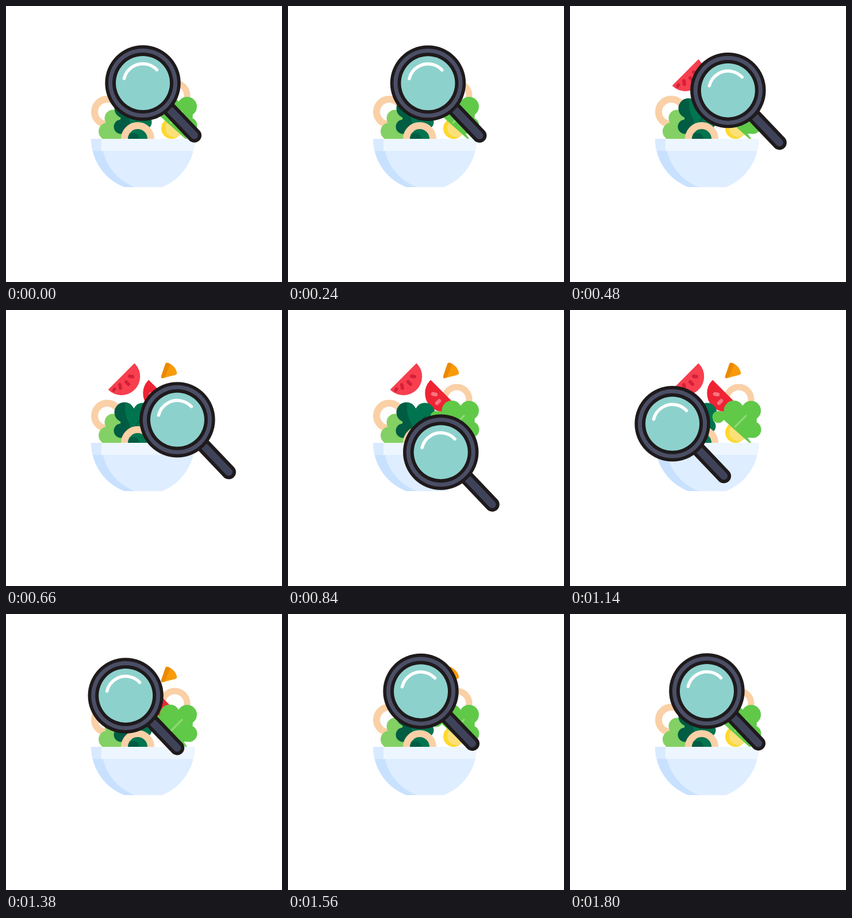
These frames come from a looping animation (480x480 px, 1860 ms). An HTML page with a canvas:

```html
<!DOCTYPE html>
<html lang="en">
<head>
<meta charset="utf-8">
<title>Salad search</title>
<style>
html, body { margin: 0; width: 100%; height: 100%; overflow: hidden; background: #fff; }
canvas { display: block; width: 480px; height: 480px; }
</style>
</head>
<body>
<canvas id="stage" width="480" height="480"></canvas>
<script>
const ctx = document.getElementById('stage').getContext('2d');
const TAU = Math.PI * 2;
const LOOP = 1860, STEP = 60, TURN = 1820;
const PEACH = '#fad0a6', DEEP = '#005c42', FOREST = '#00744f';
const LIME = '#83d064', LEAF = '#60c948', INK = '#1f1a1c';

function disk(x, y, r, color) {
  ctx.fillStyle = color;
  ctx.beginPath();
  ctx.arc(x, y, r, 0, TAU);
  ctx.fill();
}

function ring(x, y, r, width, color) {
  ctx.strokeStyle = color;
  ctx.lineWidth = width;
  ctx.beginPath();
  ctx.arc(x, y, r, 0, TAU);
  ctx.stroke();
}

function line(x1, y1, x2, y2, width, color) {
  ctx.strokeStyle = color;
  ctx.lineWidth = width;
  ctx.lineCap = 'round';
  ctx.beginPath();
  ctx.moveTo(x1, y1);
  ctx.lineTo(x2, y2);
  ctx.stroke();
}

function shape(d, color) {
  ctx.fillStyle = color;
  ctx.fill(new Path2D(d));
}

// Half disc with softened corners; the round side faces angle a.
function slice(x, y, a, color) {
  ctx.save();
  ctx.translate(x, y);
  ctx.rotate(a);
  ctx.fillStyle = ctx.strokeStyle = color;
  ctx.lineWidth = 3;
  ctx.lineJoin = 'round';
  ctx.beginPath();
  ctx.arc(1, 0, 31, -Math.PI / 2 + 0.04, Math.PI / 2 - 0.04);
  ctx.closePath();
  ctx.fill();
  ctx.stroke();
  ctx.restore();
}

function tomatoes() {
  slice(200, 115, Math.PI / 4, '#f73f4f');
  const dark = '#d42038';
  line(215, 115, 220, 116, 6, dark);
  line(209, 125, 213, 129, 6, dark);
  line(198, 130, 199, 136, 6, dark);
  line(189, 137, 187, 140, 5, dark);
  slice(271.5, 144, Math.PI * 0.75, '#ee2435');
  const pink = '#fa7580';
  line(252, 146, 257, 147, 6.5, pink);
  line(259, 162, 263, 158, 6.5, pink);
}

function carrot() {
  shape('M277.5 93Q279 91 282 92Q295 97 297.5 110Q297 112 294 113L273 118.5Q269 119 270 115Z', '#f99b0a');
  shape('M277.5 93Q279 91 282 92L286 94L276 117.5L273 118.5Q269 119 270 115Z', '#ea8a04');
}

function leftLeaves() {
  disk(186, 195, 14.5, LIME);
  disk(176, 218, 15, LIME);
  shape('M184 184L212 190L212 232L166 232L176 206Z', LIME);

  disk(206, 178, 17.5, DEEP);
  disk(200, 210, 12.5, DEEP);
  shape('M206 172L224 196L212 231L204 222L198 204L200 190Z', DEEP);
  disk(238, 179, 17.5, FOREST);
  disk(241, 202, 12.5, FOREST);
  shape('M207 160.5Q218 163 222 174L240 172L252 200L246 231L222 231L214 196Q207 184 207 174Z', FOREST);
  line(226, 200, 239, 185, 2.5, DEEP);
}

function egg() {
  shape('M262 188Q252 202 253 231L314 231Z', '#fff');
  ctx.save();
  ctx.clip(new Path2D('M264 186L253 232H314Z'));
  disk(288, 213, 18, '#fed82e');
  disk(293, 212, 16, '#fbe07a');
  ctx.restore();
}

function rightLeaf() {
  disk(258, 186, 10.5, LEAF);
  disk(285, 175, 17.5, LEAF);
  disk(315, 175, 17, LEAF);
  disk(318, 208, 14.5, LEAF);
  shape('M256 176L270 177L301 167L325 190L321 222L309 222L315 231L312 231L265 189Z', LEAF);
  line(287, 203, 306, 184, 3.5, '#8bdb70');
}

function bowl() {
  ctx.save();
  ctx.clip(new Path2D('M150 231H326Q328 231 328 233A90 90 0 0 1 148 233Q148 231 150 231Z'));
  ctx.clip(new Path2D('M328 231A90 90 0 0 1 148 231Z'));
  ctx.fillStyle = '#c8e1ff';
  ctx.fillRect(148, 231, 180, 90);
  ctx.fillStyle = '#d8eaff';
  ctx.fillRect(148, 231, 20, 21);
  disk(256, 231, 90, '#deedff');
  ctx.fillStyle = '#edf6ff';
  ctx.fillRect(166, 231, 162, 21);
  ctx.restore();
}

function salad() {
  ctx.save();
  ctx.beginPath();
  ctx.rect(0, 0, 480, 315);
  ctx.clip();
  ring(293.5, 155.5, 21.5, 11, PEACH);
  tomatoes();
  carrot();
  ring(176, 184, 22, 12, PEACH);
  leftLeaves();
  egg();
  rightLeaf();
  disk(229, 231, 17, FOREST);
  disk(222, 231, 10, DEEP);
  ring(229, 231, 23, 12, PEACH);
  bowl();
  ctx.restore();
}

function magnifier(x, y) {
  ctx.save();
  ctx.translate(x, y);
  line(40, 39, 89.5, 91, 25, INK);
  line(48, 47.5, 89.5, 91, 13, '#3f435a');
  disk(0, 0, 65.7, INK);
  disk(0, 0, 60, '#4b4f66');
  disk(0, 0, 53, INK);
  disk(0, 0, 47, '#8dd1cd');
  ctx.strokeStyle = '#fff';
  ctx.lineWidth = 5.5;
  ctx.lineCap = 'round';
  ctx.beginPath();
  ctx.arc(0, 0, 33.5, Math.PI * 1.075, Math.PI * 1.76);
  ctx.stroke();
  ctx.restore();
}

function draw(now) {
  const t = Math.floor((now % LOOP) / STEP) * STEP;
  const u = Math.min(t / TURN, 1);
  const a = TAU * u - Math.sin(TAU * u); // one eased clockwise turn
  ctx.fillStyle = '#fff';
  ctx.fillRect(0, 0, 480, 480);
  salad();
  magnifier(238 + 60 * Math.sin(a), 194 - 60 * Math.cos(a));
}

let start = null;
function tick(now) {
  if (start === null) start = now;
  draw(now - start);
  requestAnimationFrame(tick);
}
draw(0);
requestAnimationFrame(tick);
</script>
</body>
</html>
```
